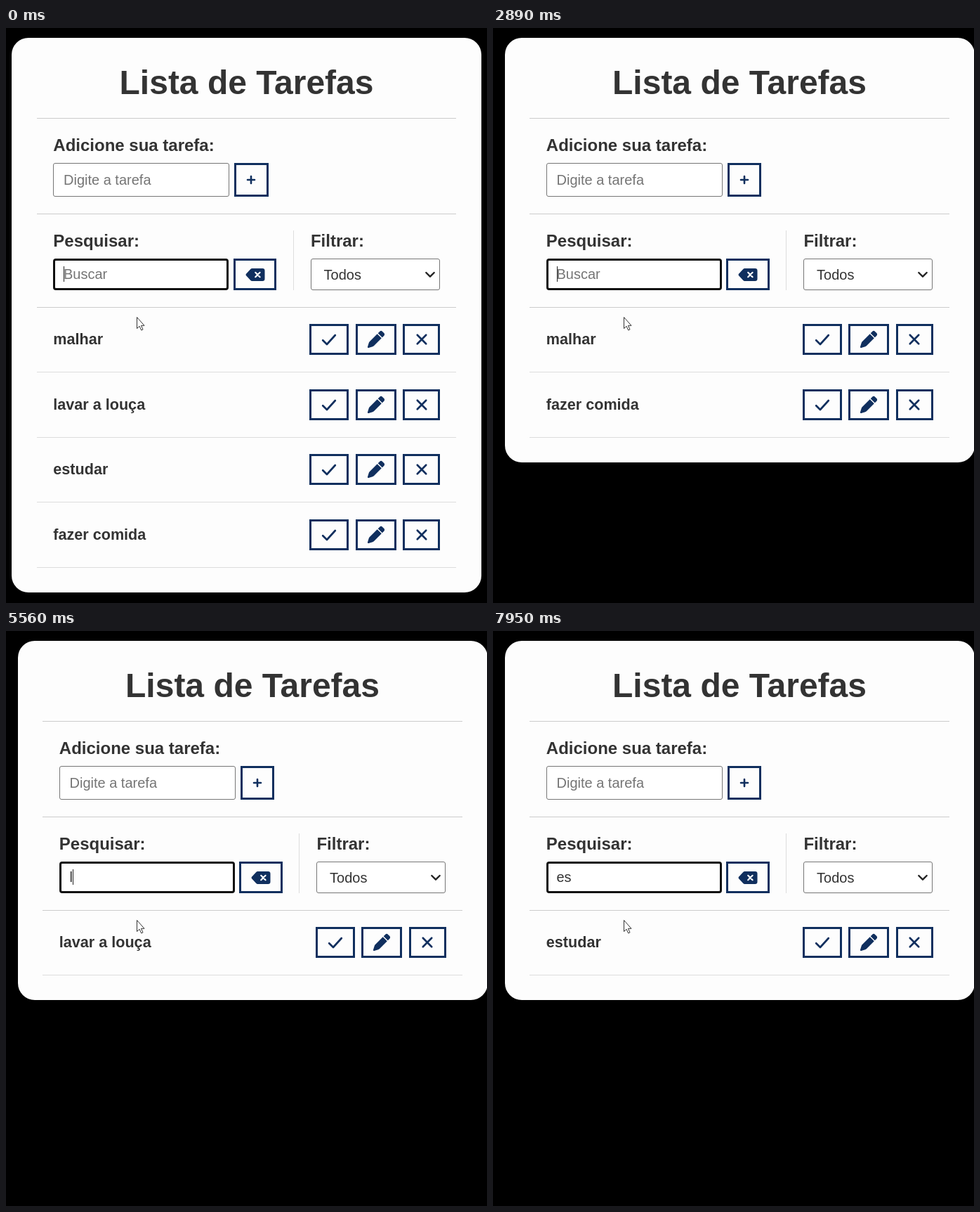
Animation of 685 by 818 pixels, one loop 8 s. Source, as an HTML page:

```html
<!DOCTYPE html>
<html lang="pt">
<head>
<meta charset="utf-8">
<title>Lista de Tarefas</title>
<style>
  html, body { margin: 0; width: 100%; height: 100%; overflow: hidden; background: #000; }
  body { position: relative; font-family: Arial, "Liberation Sans", sans-serif; color: #333; }
  div, svg, i { position: absolute; box-sizing: border-box; }
  svg { left: 0; top: 0; overflow: visible; fill: none; }
  #card { left: 8px; top: 14px; width: 669px; border-radius: 24px; background: #fdfdfd; }
  .text { white-space: pre; line-height: 1; font-size: 20px; }
  .label { font-size: 24px; font-weight: bold; }
  .task { font-size: 21.6px; font-weight: bold; }
  .title { font-size: 48px; font-weight: bold; width: 669px; text-align: center; }
  .hint { color: #757575; }
  .rule { background: #ccc; }
  .thin { background: #ddd; }
  .field { border: 1px solid #767676; border-radius: 3px; background: #fff; }
  .focus { border: 3px solid #101010; border-radius: 4px; }
  .btn { border: 3px solid #102f5e; background: #fdfdfd; }
  #caret { top: -1px; width: 1px; height: 22px; background: #222; }
</style>
</head>
<body>
<div id="app"><div id="card"></div></div>
<svg width="685" height="818">
  <path d="M186.5 411.5v16l3.6-3.3 2.6 5.7 2.3-1-2.5-5.6h4.5z" fill="#fff" stroke="#333"/>
</svg>
<script>
const PITCH = 92.55, LIST_TOP = 396.8, LOOP = 8000;
const tasks = ['malhar', 'lavar a louça', 'estudar', 'fazer comida'];
const app = document.getElementById('app');
const card = document.getElementById('card');

// Icons are drawn around their own centre.
const stroke = (d, width = 2.7, color = '#102f5e') =>
  `<path d="${d}" stroke="${color}" stroke-width="${width}" stroke-linecap="round" stroke-linejoin="round"/>`;
const icons = {
  plus: stroke('M-5 0H5M0-5V5', 2.6),
  check: stroke('M-8.8 1.2L-3 7 8.8-6'),
  cross: stroke('M-6.2-6.2L6.2 6.2M6.2-6.2L-6.2 6.2'),
  chevron: stroke('M-5.7-3L0 2.7 5.7-3', 2.4, '#222'),
  erase: '<path fill="#102f5e" d="M-4.5-9H10.3a3.2 3.2 0 0 1 3.2 3.2V5.8A3.2 3.2 0 0 1 10.3 9H-4.5a3 3 0 0 1-2.2-.9L-13 1.3a2 2 0 0 1 0-2.6L-6.7-8.1A3 3 0 0 1-4.5-9z"/>'
    + stroke('M.2-3.2L6.6 3.2M6.6-3.2L.2 3.2', 2.2, '#fdfdfd'),
  pencil: '<path transform="translate(-12 -12)" fill="#102f5e" d="M17 .9L14.7 3.2l6.1 6.1L23.1 7a3 3 0 0 0 0-4.2L21.2.9a3 3 0 0 0-4.2 0zM13.7 4.2l-11 11a4 4 0 0 0-1 1.7L0 22.6A1.1 1.1 0 0 0 1.4 24l5.7-1.7a4 4 0 0 0 1.7-1l11-11z"/>'
};

function add(cls, x, y, w, h, parent = app, html = '') {
  const el = document.createElement('div');
  el.className = cls;
  el.style.cssText = `left:${x}px;top:${y}px`;
  if (w) el.style.width = w + 'px';
  if (h) el.style.height = h + 'px';
  el.innerHTML = html;
  parent.append(el);
  return el;
}
const text = (cls, x, y, content, parent) => add('text ' + cls, x, y, 0, 0, parent, content);
const icon = (name, x, y, parent) =>
  add('', x, y, 0, 0, parent, `<svg width="1" height="1">${icons[name]}</svg>`);
function button(name, x, y, w, h, parent) {
  add('btn', x, y, w, h, parent);
  icon(name, x + w / 2, y + h / 2, parent);
}

text('title', 8, 54, 'Lista de Tarefas');
for (const y of [128, 264, 397]) add('rule', 43.5, y, 597.5, 1);

text('label', 67.3, 155, 'Adicione sua tarefa:');
add('field', 67, 192, 251, 48);
text('hint', 82, 206, 'Digite a tarefa');
button('plus', 325, 192, 48.5, 48);

text('label', 67.3, 291, 'Pesquisar:');
add('field focus', 67, 328, 250, 45);
const search = text('', 82, 340,
  '<span></span><i id="caret"></i><span class="hint">Buscar</span>');
const [typed, caret, hint] = search.children;
button('erase', 323.6, 328, 61.8, 45);
add('thin', 408.9, 288, 1, 85);

text('label', 433.9, 291, 'Filtrar:');
add('field', 433.6, 328, 184.4, 45);
text('', 452.6, 341, 'Todos');
icon('chevron', 603.5, 350.5);

const rows = tasks.map(name => {
  const row = add('', 0, 0);
  text('task', 67.3, 35.4, name, row);
  button('check', 432, 24.6, 56, 43.6, row);
  button('pencil', 497.5, 24.6, 58, 43.6, row);
  button('cross', 565, 24.6, 53, 43.6, row);
  add('thin', 43.5, PITCH, 597.5, 1, row);
  return row;
});

// time, typed text, active search, caret visible
const steps = [
  [0, '', '', 1], [70, '', '', 0], [600, '', '', 1],
  [730, 'm', '', 1], [800, 'm', 'm', 1], [930, 'ma', 'm', 1], [1060, 'mal', 'mal', 1],
  [1330, 'malh', 'mal', 1], [1390, 'malha', 'mal', 1], [1660, 'malhar', 'mal', 1],
  [2010, 'malha', 'mal', 1], [2150, 'malh', 'mal', 1], [2350, 'mal', 'mal', 1],
  [2550, 'ma', 'ma', 1], [2690, 'm', 'ma', 1], [2750, 'm', 'm', 1], [2820, '', 'm', 1],
  [3020, '', '', 1], [3280, '', '', 0], [3810, '', '', 1],
  [3880, 'l', '', 1], [3950, 'l', 'l', 1], [4020, 'la', 'l', 1], [4170, 'lav', 'la', 1],
  [4300, 'lava', 'la', 1], [4830, 'lava', 'la', 0], [5160, 'lav', 'la', 0],
  [5360, 'la', 'la', 1], [5560, 'l', 'la', 1], [5690, 'l', 'l', 1],
  [5890, '', 'l', 1], [5960, '', '', 1], [6420, '', '', 0],
  [6620, 'e', '', 1], [6690, 'e', 'e', 1], [6820, 'es', 'e', 1], [6890, 'es', 'es', 1],
  [7020, 'est', 'es', 1], [7150, 'estu', 'es', 1], [7750, 'est', 'es', 0], [7950, 'es', 'es', 0]
];

let shown;
function draw(t) {
  const step = steps.findLast(s => s[0] <= t);
  if (step === shown) return;
  shown = step;
  const [, value, query, caretOn] = step;
  typed.textContent = value;
  hint.style.display = value ? 'none' : '';
  caret.style.visibility = caretOn ? '' : 'hidden';

  let count = 0;
  rows.forEach((row, i) => {
    const match = tasks[i].includes(query);
    row.style.display = match ? '' : 'none';
    if (match) row.style.top = LIST_TOP + PITCH * count++ + 'px';
  });
  card.style.height = LIST_TOP + PITCH * count + 36 - 14 + 'px';
  // The page is centred, so it shifts when the scrollbar goes away.
  app.style.left = count < tasks.length ? '8.5px' : '0';
}

const start = performance.now();
function tick() {
  draw((performance.now() - start) % LOOP);
  requestAnimationFrame(tick);
}
tick();
</script>
</body>
</html>
```
